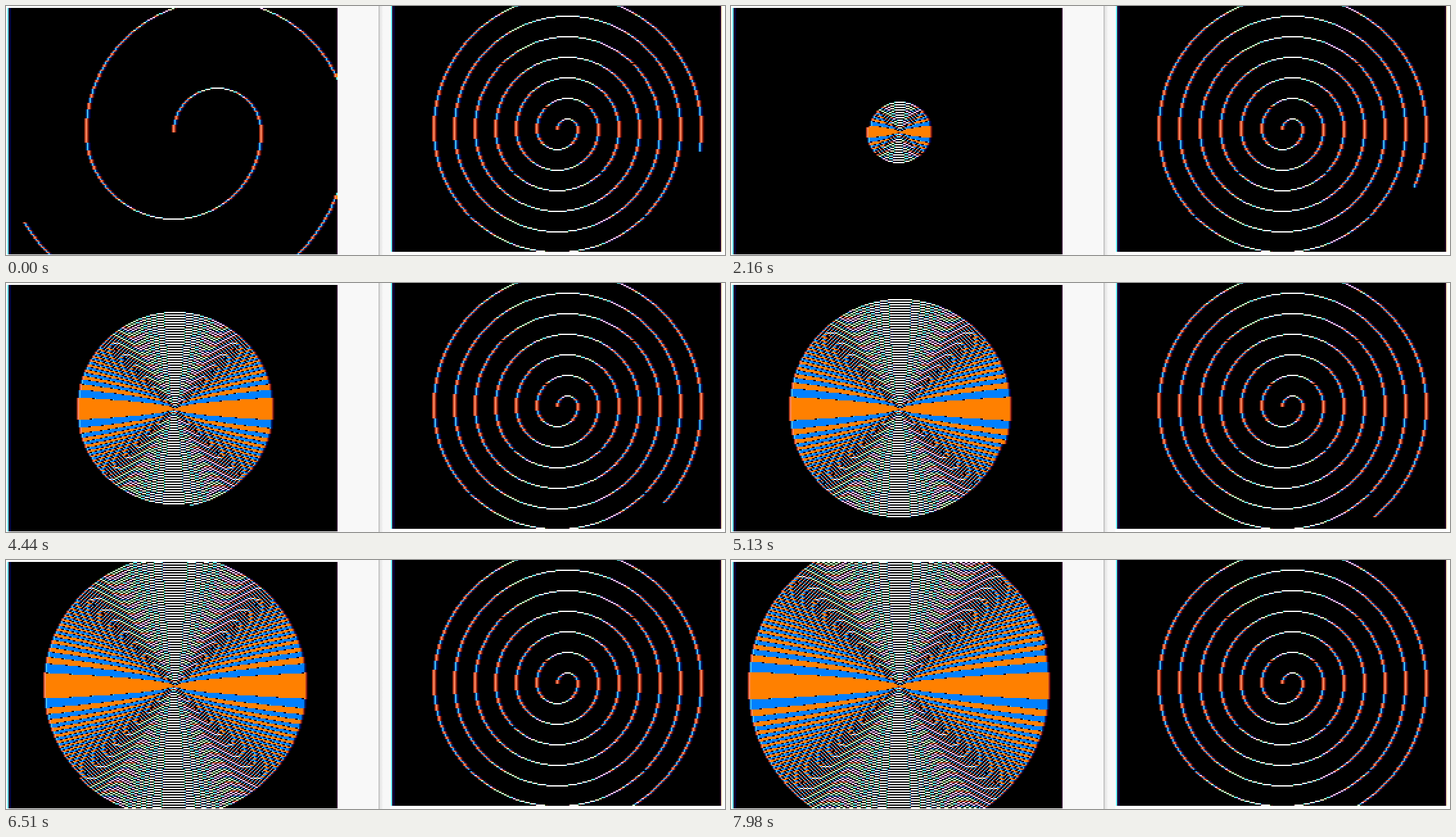
Recreate the animation shown at these times as an HTML page with a canvas. Size 1119 by 388 pixels, loop 8 s.

```html
<!DOCTYPE html>
<html lang="en">
<head>
<meta charset="utf-8">
<title>Spirals</title>
<style>
  html, body { margin: 0; width: 100%; height: 100%; overflow: hidden; background: #f8f8f8; }
  canvas { display: block; }
</style>
</head>
<body>
<canvas id="stage" width="1119" height="388"></canvas>
<script>
const W = 256, H = 192, LOOP = 8000, TICK = 30;
const ctx = document.getElementById('stage').getContext('2d');
ctx.imageSmoothingEnabled = false;

// Composite-video colours: one letter per 5-pixel neighbourhood, for even and odd columns.
const palette = {
  k: 0x000000, w: 0xffffff, o: 0xff8000, b: 0x0080ff, r: 0xff8c64, c: 0x46c8ff,
  d: 0xb43c1e, n: 0x003278, m: 0x3c0000, v: 0x00003c, g: 0x002800, p: 0x280028,
  P: 0xffd2ff, G: 0xd2ffd2, Y: 0xfff0c8, C: 0x64f0ff
};
const tints = [
  'kkngrrPYnvbbGwCwmmkgoowYppbbYwww',
  'kkdpccGCdmooPwYwvvkpbbwCggooCwww'
].map(row => [...row].map(ch => {
  const v = palette[ch];
  return (0xff000000 | (v & 255) << 16 | v & 0xff00 | v >> 16) >>> 0;
}));

// Half circle as ordered pixels, from (r, 0) through (0, r) to (-r, 0).
const halves = new Map();
function halfCircle(r) {
  if (halves.has(r)) return halves.get(r);
  const side = [], cap = [];
  for (let d = 0; d <= r * Math.SQRT1_2; d++) {
    const m = Math.round(Math.sqrt(r * r - d * d));
    side.push([m, d]);
    cap.unshift([d, m]);
  }
  const quarter = side.concat(cap);
  const half = quarter.concat(quarter.map(([x, y]) => [-x, y]).reverse());
  halves.set(r, half);
  return half;
}

function makeScreen() {
  const canvas = document.createElement('canvas');
  canvas.width = W + 2;
  canvas.height = H;
  const c = canvas.getContext('2d');
  const image = c.createImageData(W + 2, H);
  return { canvas, c, image, out: new Uint32Array(image.data.buffer), bits: new Uint8Array(W * H) };
}

// Odd arcs run over the top, even arcs run underneath.
function drawArc(screen, step, k, keep) {
  const odd = k % 2, cx = W / 2 + (odd ? step : 0), sign = odd ? -1 : 1;
  const points = halfCircle(k * step);
  points.forEach(([x, y], i) => {
    if (!keep(i / points.length, x, y)) return;
    const px = cx + sign * x, py = H / 2 + sign * y;
    if (px >= 0 && px < W && py >= 0 && py < H) screen.bits[py * W + px] = 1;
  });
}

// Progress is measured in accumulated arc radius.
function drawSpiral(screen, step, progress, maxArcs) {
  for (let k = 1; k <= maxArcs && progress > 0; k++) {
    const part = progress / (k * step);
    drawArc(screen, step, k, f => f < part);
    progress -= k * step;
  }
}

function paint(screen, left, top, columns) {
  const { bits, out } = screen;
  for (let y = 0; y < H; y++) {
    const bit = x => x < 0 || x >= W ? 1 : bits[y * W + x];
    let near = bit(-3) << 3 | bit(-2) << 2 | bit(-1) << 1 | bit(0);
    for (let x = -1; x <= W; x++) {
      near = (near << 1 | bit(x + 2)) & 31;
      out[y * (W + 2) + x + 1] = tints[x & 1][near];
    }
  }
  screen.c.putImageData(screen.image, 0, 0);
  ctx.drawImage(screen.canvas, 0, 0, columns, H, left, top, columns * 2, H * 2);
}

const fast = makeScreen(), slow = makeScreen();

function drawFast(t) {
  fast.bits.fill(0);
  if (t >= 1894) {
    drawSpiral(fast, 1, (t - 1894) / 0.883, 160);
    return;
  }
  let step = 34, progress = 314.8 + t / 0.809;
  while (step < 40 && progress >= step * 10) progress -= 10 * step++;
  drawSpiral(fast, step, progress, 4);
}

// Depth of the slow pen below the centre, in stage pixels.
const depth = [[0, 35], [3120, 117], [3210, 120], [4050, 140.5], [4440, 151], [4860, 164], [5670, 192], [LOOP, 230]];
function depthAt(t) {
  const i = depth.findIndex(([end]) => end > t);
  const [t0, y0] = depth[i - 1], [t1, y1] = depth[i];
  return y0 + (y1 - y0) * (t - t0) / (t1 - t0);
}

function drawSlow(t) {
  const limit = depthAt(t) / 2;
  slow.bits.fill(0);
  drawSpiral(slow, 8, 8 * 91, 13);
  drawArc(slow, 8, 14, (f, x, y) => x > 0 && y <= limit);
}

function drawBackdrop() {
  ctx.fillStyle = '#f8f8f8';
  ctx.fillRect(0, 0, 1119, 388);
  ctx.fillStyle = '#fff';
  ctx.fillRect(0, 0, 516, 388);
  ctx.fillRect(598, 0, 521, 388);
  const shade = ctx.createLinearGradient(581, 0, 587, 0);
  shade.addColorStop(0, '#dedede');
  shade.addColorStop(1, '#f8f8f8');
  ctx.fillStyle = shade;
  ctx.fillRect(581, 0, 6, 388);
  ctx.fillStyle = '#ababab';
  ctx.fillRect(580, 0, 1, 388);
}

const start = performance.now();
let shown = -1;
function frame() {
  const elapsed = Math.max(0, performance.now() - start) % LOOP;
  const t = Math.floor(elapsed / TICK) * TICK;
  if (t !== shown) {
    shown = t;
    drawFast(t);
    drawSlow(t);
    paint(fast, 2, 3, W + 1);
    paint(slow, 599, -1, W + 2);
  }
  requestAnimationFrame(frame);
}
drawBackdrop();
frame();
</script>
</body>
</html>
```
